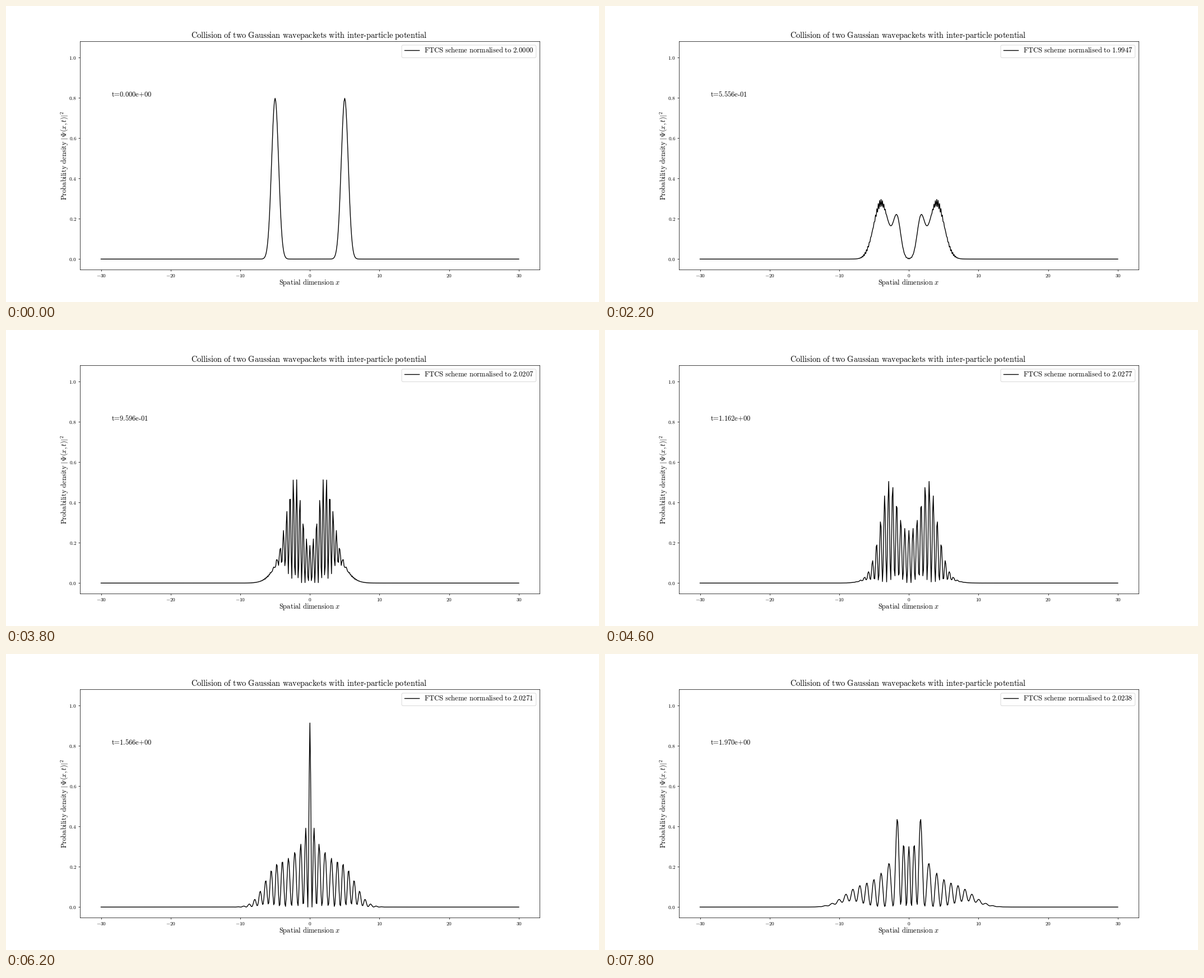
Recreate the animation shown at these times as a matplotlib script. Size 1058 px wide and 529 px high, loop 8 s.

```python
import matplotlib.pyplot as plt
import numpy as np
from matplotlib.animation import FuncAnimation
from matplotlib.patches import FancyBboxPatch

plt.rcParams["mathtext.fontset"] = "cm"

W, H = 1058, 529
FRAMES, INTERVAL = 40, 200
STEP = 5 / 99

GRID = np.linspace(-30, 30, 601)
DIST = np.abs(GRID)

# Key steps: start, steep front, first overlap, crossing, ..., refocus, end
KEYS = [0, 7, 15, 19, 26, 31, 39]
NORM = [2.0, 2.0014, 1.9880, 2.0207, 2.0329, 2.0271, 2.0238]
RUNNER_X = [5, 3.2, 0.2, -1.9, -3.9, -5.4, -7.8]
RUNNER_S = [0.5, 0.25, 0.8, 0.9, 1.2, 1.5, 2.0]
FOCUS_X = [5, 4.4, 3.6, 3, 2, 0, -1.6]
FOCUS_S = [0.5, 0.8, 1.2, 1.2, 0.7, 0.28, 0.4]


def at(i, values):
    return np.interp(i, KEYS, values)


def pulse(mass, centre, sigma):
    z = (GRID - centre) / sigma
    return mass * np.exp(-z * z / 2) / (sigma * np.sqrt(2 * np.pi))


def packet(i):
    """Right-hand packet: a spreading bulk, a fast runner, a late focus."""
    t = i * STEP
    bulk = pulse(0.65, 5 - 1.5 * t - 0.6 * t * t, 0.5 * np.sqrt(1 + 12 * t * t))
    runner = pulse(0.25, at(i, RUNNER_X), at(i, RUNNER_S))
    focus = pulse(0.10, at(i, FOCUS_X), at(i, FOCUS_S))
    return bulk + runner + focus


def density(i):
    right = packet(i)
    left = right[::-1]
    # fringes widen with time and finally crowd towards the centre
    spacing = max(0.1, 0.527 * i * STEP - 0.03)
    crowd = np.interp(i, [26, 31], [0, 0.4])
    order = GRID / spacing + crowd * GRID * np.exp(-GRID ** 2 / 4)
    rho = right + left + 2 * np.sqrt(right * left) * np.cos(2 * np.pi * order)
    # grid-scale ripple on the outer flanks
    size = np.interp(i, [0, 7, 28], [0, 0.042, 0])
    edge = np.interp(i, [0, 15, 26], [4, 2.8, 6])
    ripple = size * np.sqrt(np.maximum(rho, 0)) * np.cos(2 * np.pi * DIST / 0.21)
    return np.maximum(rho + ripple * (DIST > edge), 0)


def tex(text, math=""):
    words = r"\ ".join(rf"\text{{{w}}}" for w in text.split())
    return f"${words}{math}$"


fig = plt.figure(figsize=(16, 8), dpi=W / 16, facecolor="white")
ax = fig.add_subplot()
ax.set_xlim(-33, 33)
ax.set_ylim(-0.0514, 1.0794)
xticks = range(-30, 31, 10)
yticks = np.arange(6) / 5
ax.set_xticks(xticks, [f"${v}$" for v in xticks], fontsize=10)
ax.set_yticks(yticks, [f"${v:.1f}$" for v in yticks], fontsize=10)
curve, = ax.plot(GRID, density(0), color="black", lw=1.5)

# Overlay in pixel coordinates for the captions and the legend
page = fig.add_axes([0, 0, 1, 1])
page.set_xlim(0, W)
page.set_ylim(H, 0)
page.axis("off")


def label(x, y, text, size=13.7, **kw):
    return page.text(x, y, text, fontsize=size, va="baseline", **kw)


label(541.2, 57.3, tex("Collision of two Gaussian wavepackets with "
                       "inter-particle potential"), 15.7, ha="center")
label(541.8, 498, tex("Spatial dimension", r"\ x"), ha="center")
label(108, 267, tex("Probability density", r"\ |\Psi(x,t)|^2"),
      ha="center", rotation=90, rotation_mode="anchor")

page.add_patch(FancyBboxPatch((708.6, 72.5), 234.6, 17.4,
                              boxstyle="round,pad=2.6,rounding_size=2.6",
                              fc="white", ec="0.8", lw=1, alpha=0.8))
page.plot([711, 737], [78.8, 78.8], color="black", lw=1.5)
norm_text = label(746.5, 83.2, "", 13.77)
time_text = label(188.2, 162, "", 13.55)


def draw(i):
    curve.set_ydata(density(i))
    norm_text.set_text(tex(f"FTCS scheme normalised to {at(i, NORM):.4f}"))
    time_text.set_text(tex(f"t={i * STEP:.3e}"))
    return curve, norm_text, time_text


anim = FuncAnimation(fig, draw, frames=FRAMES, interval=INTERVAL, repeat=True)
plt.show()
```
